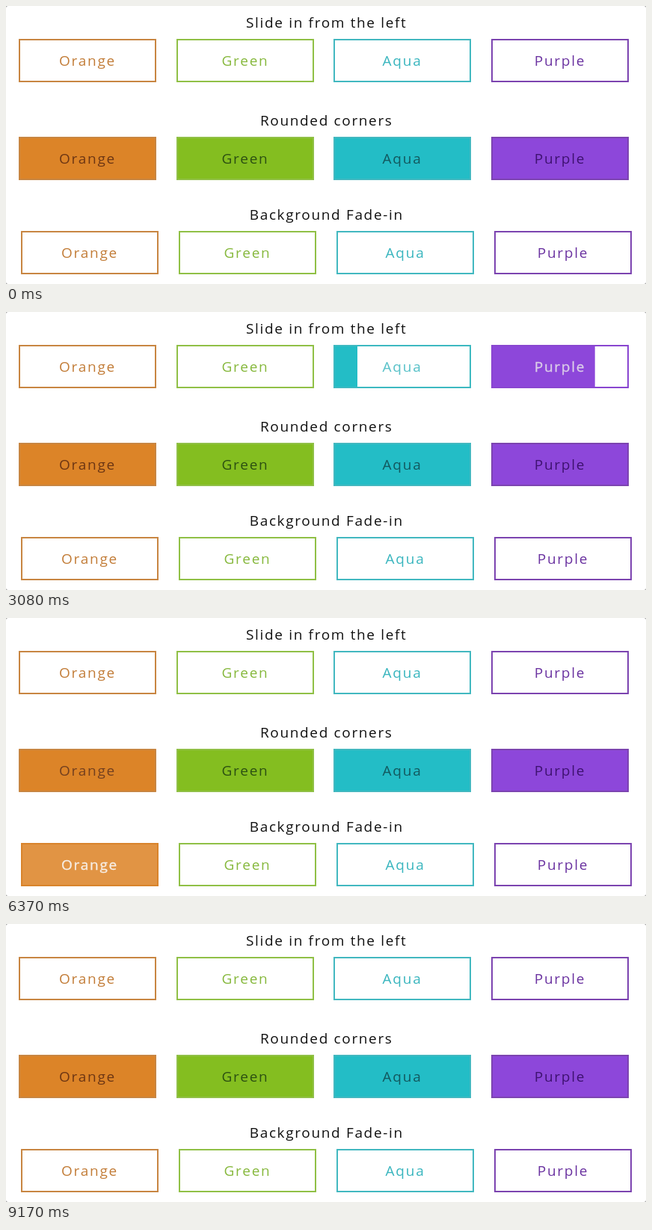
These frames come from a looping animation (856x372 px, 9.24 s). An HTML page:

```html
<!DOCTYPE html>
<html lang="en">
<head>
<meta charset="utf-8">
<title>Button hover effects</title>
<style>
  html, body { margin: 0; width: 100%; height: 100%; overflow: hidden; background: #999; }
  #stage {
    position: absolute; left: 0; top: 0; width: 856px; height: 372px;
    overflow: hidden; border-radius: 3px; background: #fff;
    font: 19px "Open Sans", sans-serif; letter-spacing: 1.65px; text-align: center;
  }
  h2 {
    position: absolute; left: 0; width: 857.5px; margin: 0;
    font: inherit; line-height: 28px; color: #111;
  }
  .button {
    position: absolute; box-sizing: border-box; width: 184px; height: 58px;
    border: 2px solid; line-height: 54px; letter-spacing: 1.75px;
    background-repeat: no-repeat;
  }
</style>
</head>
<body>
<div id="stage"></div>
<script>
const LOOP = 9240, STEP = 70, TRANSITION = 500;
const stage = document.getElementById("stage");
const WHITE = [255, 255, 255];

const colors = [
  { name: "Orange", fill: [220, 132, 40], border: [200, 134, 66], text: [194, 124, 55], dark: [108, 54, 20] },
  { name: "Green", fill: [132, 190, 32], border: [144, 192, 70], text: [134, 184, 60], dark: [44, 80, 18] },
  { name: "Aqua", fill: [35, 189, 198], border: [66, 184, 192], text: [56, 181, 190], dark: [18, 88, 94] },
  { name: "Purple", fill: [141, 71, 218], border: [124, 68, 176], text: [106, 50, 160], dark: [62, 18, 112] }
];

// The pointer snakes through the rows; each pair is [enter, leave] in ms.
const rows = [
  { title: "Slide in from the left", titleY: 8, left: 17, top: 44, pitch: 210.67, effect: "slide",
    hovers: [[1315, 1850], [1890, 2350], [2390, 2815], [2850, 3500]] },
  { title: "Rounded corners", titleY: 139, left: 17, top: 175, pitch: 210.67, effect: "round",
    hovers: [[5460, 6010], [4800, 5420], [4290, 4760], [3700, 4250]] },
  { title: "Background Fade-in", titleY: 265, left: 20, top: 301, pitch: 211, effect: "fade",
    hovers: [[6080, 6480], [6520, 7180], [7220, 7890], [7950, 8350]] }
];

// CSS "ease": cubic-bezier(.25, .1, .25, 1)
function ease(x) {
  if (x <= 0) return 0;
  if (x >= 1) return 1;
  const bezier = (a, b, s) => 3 * a * s * (1 - s) ** 2 + 3 * b * s * s * (1 - s) + s ** 3;
  let low = 0, high = 1;
  for (let i = 0; i < 24; i++) {
    const mid = (low + high) / 2;
    if (bezier(.25, .25, mid) < x) low = mid; else high = mid;
  }
  return bezier(.1, 1, low);
}

const rgb = c => `rgb(${c.map(Math.round)})`;
const mix = (a, b, p) => rgb(a.map((v, i) => v + (b[i] - v) * p));

function add(tag, text, left, top) {
  const el = document.createElement(tag);
  el.textContent = text;
  el.style.left = left + "px";
  el.style.top = top + "px";
  return stage.appendChild(el);
}

const buttons = rows.flatMap(row => {
  add("h2", row.title, 0, row.titleY);
  return colors.map((color, i) => {
    const el = add("div", color.name, Math.floor(row.left + i * row.pitch + .34), row.top);
    el.className = "button";
    el.style.borderColor = rgb(color.border);
    return { el, color, effect: row.effect, hover: row.hovers[i] };
  });
});

function paint({ el, color, effect, hover: [enter, leave] }, time) {
  const p = ease((time - enter) / TRANSITION) * (1 - ease((time - leave) / TRANSITION));
  const style = el.style;
  style.color = mix(effect === "round" ? color.dark : color.text, WHITE, p);
  style.webkitTextStroke = p > .01 ? `${.4 * p}px` : "";
  if (effect === "slide") {
    const fill = rgb(color.fill);
    style.backgroundImage = `linear-gradient(${fill}, ${fill})`;
    style.backgroundSize = `${p * 100}% 100%`;
  } else if (effect === "round") {
    style.backgroundColor = rgb(color.fill);
    style.borderRadius = 15 * p + "px";
  } else {
    style.backgroundColor = mix(WHITE, color.fill, p);
  }
  if (effect !== "round") style.borderColor = mix(color.border, color.fill, p);
}

function frame(now) {
  const time = Math.floor((now % LOOP) / STEP) * STEP;
  buttons.forEach(button => paint(button, time));
  requestAnimationFrame(frame);
}
frame(0);
</script>
</body>
</html>
```
